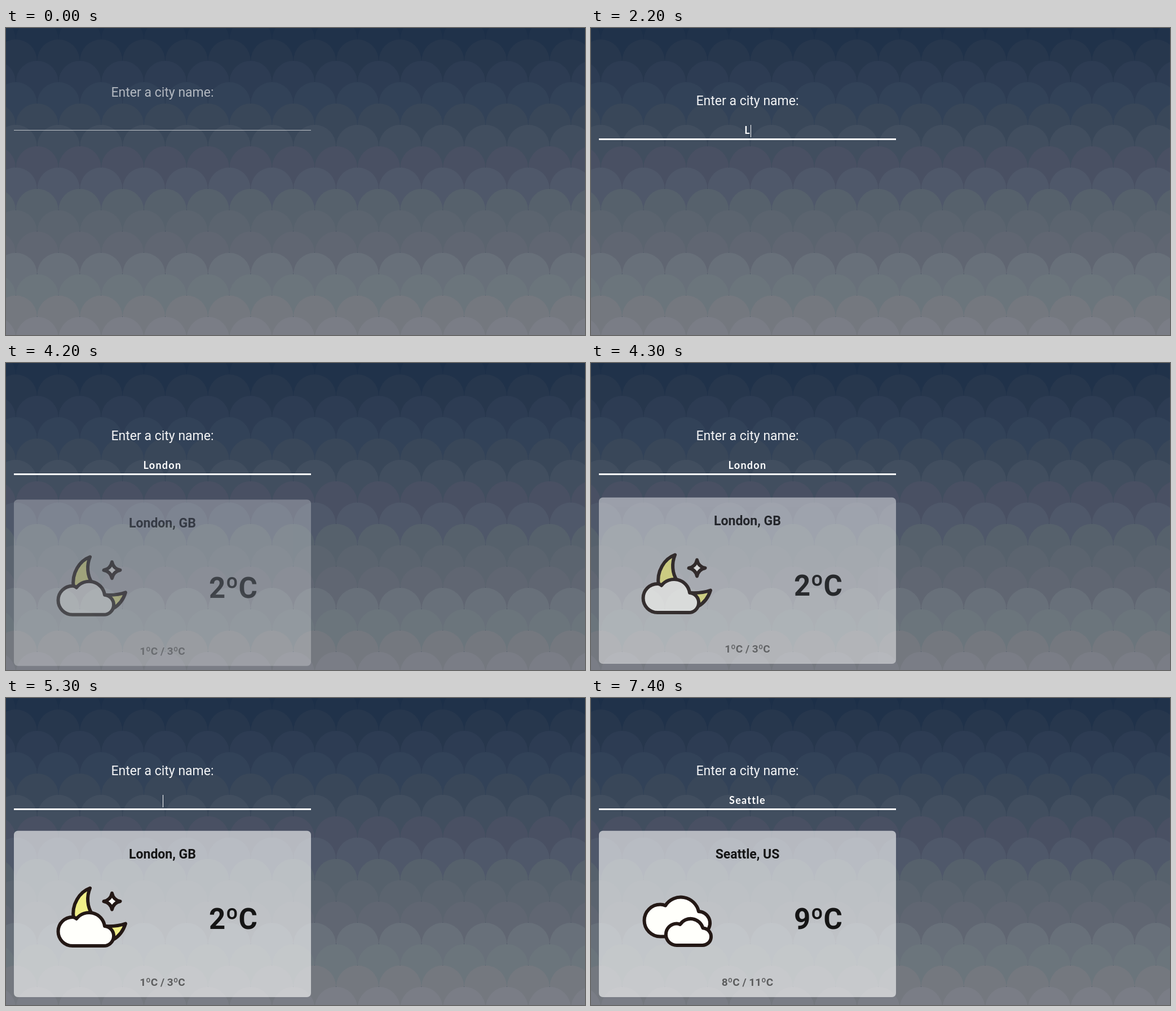
These frames come from a looping animation (1027 by 545 pixels, 8 s). An HTML page:

```html
<!DOCTYPE html>
<html lang="en">
<head>
<meta charset="utf-8">
<title>City weather</title>
<style>
  html, body { margin: 0; width: 100%; height: 100%; overflow: hidden; background: #1c2f48; }
  svg { display: block; width: 1027px; height: 545px; }
  text { font-family: Roboto, sans-serif; text-anchor: middle; white-space: pre; }
  .label { font-size: 23px; fill: #f3f4f5; }
  .typed { font: 700 18px Lato, sans-serif; letter-spacing: 1.28px; fill: #fff; }
  #card text { font-weight: 700; fill: #151515; }
  .icon { fill: #fffffb; stroke: #231815; stroke-width: 6; stroke-linejoin: round; stroke-linecap: round; }
  .icon .moon { fill: #f0ee88; }
</style>
</head>
<body>
<svg viewBox="0 0 1027 545">
  <g id="scales"></g>

  <g id="head">
    <text class="label" x="277.5" y="137">Enter a city name:</text>
    <text class="typed" id="typed" x="277.5" y="188"></text>
    <rect id="caret" y="172" width="1" height="22" fill="#fff"/>
    <rect id="line" x="14" y="196" width="527" height="1" fill="#fff"/>
  </g>

  <g id="card">
    <rect x="14" y="235.7" width="527" height="295.3" rx="7" fill="#fff" fill-opacity=".6"/>
    <text id="city" x="277.5" y="285" font-size="23"></text>
    <text id="temp" x="403" y="410" font-size="51"></text>
    <text id="range" x="277.5" y="511" font-size="19" opacity=".6"></text>
    <g class="icon" id="night">
      <path class="moon" d="M149 337.5C131 344 115.5 366 120 392L153 384C143.5 370 143 352 149 337.5Z"/>
      <path class="moon" d="M176 405Q197 406 212 400.5Q206 420 190 429Z"/>
      <path d="M188 346.5Q190.5 358.5 202.5 361Q190.5 363.5 188 375.5Q185.5 363.5 173.5 361Q185.5 358.5 188 346.5Z"/>
      <path d="M118 440A25.5 25.5 0 0 1 118 389Q122 389 125 392A28 28 0 0 1 175 405A17.5 17.5 0 0 1 172 440Z"/>
    </g>
    <g class="icon" id="clouds">
      <path d="M123 423.5A28.5 28.5 0 0 1 123 366.5Q128 366.5 132 368.5A32.5 32.5 0 0 1 191 379A20.5 20.5 0 0 1 206 413L150 423.5Z"/>
      <path d="M152 439A19.2 19.2 0 0 1 152 400.6Q155 400.6 158 402A22.5 22.5 0 0 1 198.5 408.5A15.2 15.2 0 0 1 197 439Z"/>
    </g>
  </g>
</svg>

<script>
const LOOP = 8000, TICK = 100, MID = 277.5;
const $ = id => document.getElementById(id);
const clamp = v => Math.max(0, Math.min(1, v));
const easeOut = p => 1 - (1 - p) ** 2;

// Overlapping rows of circles, each row half a step lower and shifted sideways.
const ROWS = ['#20324a', '#27374d', '#2d3c53', '#324258', '#394759', '#414e5f', '#495063', '#4f586a',
  '#56616c', '#5b646f', '#606672', '#68707a', '#6b757c', '#74787f', '#7a7d86'];
const PITCH = 75.75;
$('scales').innerHTML = ROWS.map((color, row) => {
  const left = row % 2 ? 17.3 : 55.2 - PITCH;
  let circles = '';
  for (let x = left; x < 1027 + PITCH; x += PITCH)
    circles += `<circle cx="${x}" cy="${20 + row * PITCH / 2}" r="37.6"/>`;
  return `<g fill="${color}">${circles}</g>`;
}).join('');

// Time, text in the field, caret shown
const TYPING = [
  [0, '', 0], [1400, '', 1], [2200, 'L', 1], [2400, 'Lo', 1], [2600, 'Lon', 0], [2800, 'Lond', 1],
  [2900, 'London', 1], [3800, 'London', 0], [5300, '', 1], [5800, 'S', 1], [6000, 'Se', 1],
  [6100, 'Sea', 1], [6200, 'Sea', 0], [6500, 'Seatt', 1], [6700, 'Seattle', 1], [7400, 'Seattle', 0]
];

function fade(el, opacity, drop) {
  el.setAttribute('opacity', opacity);
  el.setAttribute('transform', `translate(0 ${drop * (1 - opacity)})`);
}

function setText(id, value) {
  if ($(id).textContent !== value) $(id).textContent = value;
}

function show(id, on) {
  $(id).style.display = on ? '' : 'none';
}

function draw(t) {
  fade($('head'), t < 100 ? 0.667 : t < 200 ? 0.89 : 1, -45);

  const [, text, caret] = TYPING.filter(step => step[0] <= t).pop();
  setText('typed', text);
  show('caret', caret);
  const width = text ? $('typed').getComputedTextLength() : 0;
  $('caret').setAttribute('x', Math.round(MID + width / 2 + 0.2));
  $('line').setAttribute('height', 1 + 2 * clamp((t - 1300) / 700));

  show('card', t >= 4200);
  fade($('card'), easeOut(clamp((t - 4100) / 400)), 12);
  const second = t >= 7000;
  setText('city', second ? 'Seattle, US' : 'London, GB');
  setText('temp', second ? '9ºC' : '2ºC');
  setText('range', second ? '8ºC / 11ºC' : '1ºC / 3ºC');
  show('night', t < 7400);
  show('clouds', t >= 7400);
}

let start;
function loop(now) {
  start ??= now;
  draw(Math.floor((now - start) % LOOP / TICK) * TICK);
  requestAnimationFrame(loop);
}
draw(0);
requestAnimationFrame(loop);
</script>
</body>
</html>
```
